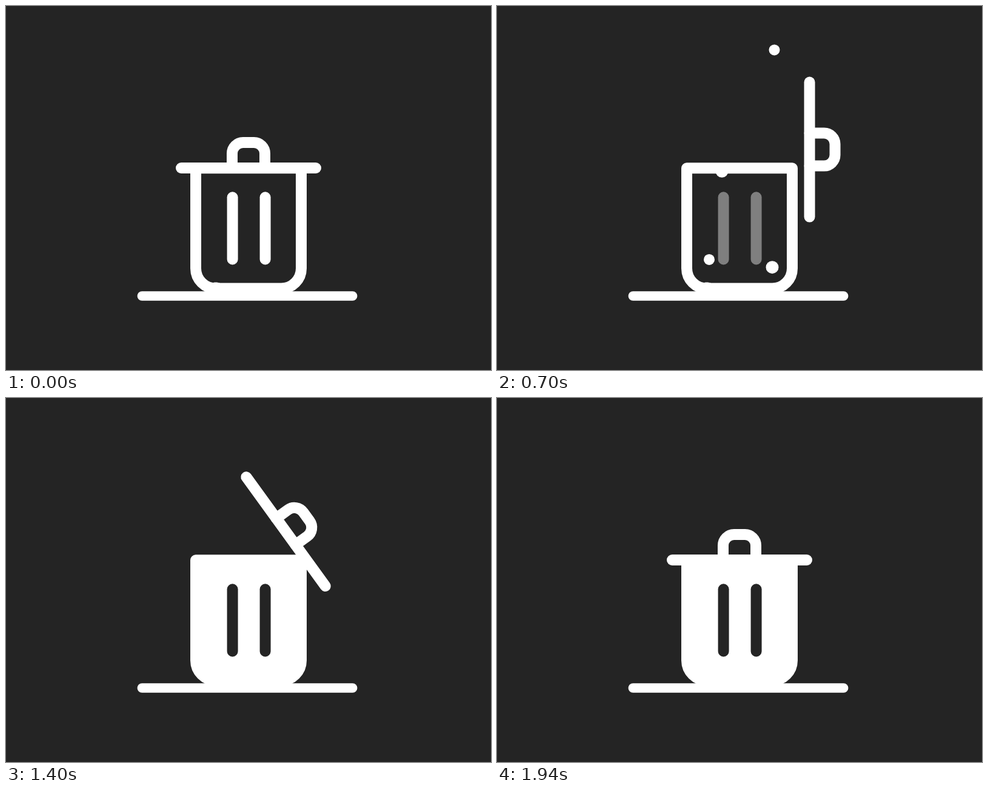
Write an HTML page with a canvas that moves like this. It is 800 px wide and 600 px high and loops after 1980 ms.

```html
<!DOCTYPE html>
<html lang="en">
<head>
<meta charset="utf-8">
<title>Bin</title>
<style>
html, body { margin: 0; width: 100%; height: 100%; overflow: hidden; background: #242424; }
canvas { display: block; }
</style>
</head>
<body>
<canvas id="stage" width="800" height="600"></canvas>
<script>
const ctx = document.getElementById('stage').getContext('2d');
const BG = '#242424', INK = '#fff', LOOP = 1980;

// x, start height, radius, start time
const dots = [
  [454, 100, 10.5, 355],
  [350, 105, 9, 362],
  [371, 92, 10.5, 448],
  [457.5, 49, 9, 614],
  [422.5, 95, 9.5, 716],
  [364, 100, 10.5, 802]
];

const span = (t, a, b) => Math.min(1, Math.max(0, (t - a) / (b - a)));
const ease = k => k * k * (3 - 2 * k);

function line(x1, y1, x2, y2, width, color) {
  ctx.lineWidth = width;
  ctx.strokeStyle = color;
  ctx.beginPath();
  ctx.moveTo(x1, y1);
  ctx.lineTo(x2, y2);
  ctx.stroke();
}

function binPath() {
  ctx.beginPath();
  ctx.moveTo(313, 267.3);
  ctx.lineTo(487, 267.3);
  ctx.arcTo(487, 465.5, 400, 465.5, 33);
  ctx.arcTo(313, 465.5, 313, 300, 33);
  ctx.closePath();
}

function drawFill(t) {
  const top = 455.5 - 285 * ease(span(t, 840, 1340));
  ctx.save();
  binPath();
  ctx.clip();
  ctx.beginPath();
  ctx.moveTo(304, 480);
  for (let x = 304; x <= 496; x += 2) {
    ctx.lineTo(x, top + 34 * (1 - Math.cos((x - 346) * Math.PI / 78)));
  }
  ctx.lineTo(496, 480);
  ctx.fillStyle = INK;
  ctx.fill();
  ctx.restore();
}

function drawDots(t) {
  ctx.fillStyle = INK;
  for (const [x, y, r, start] of dots) {
    const k = (t - start) / 360;
    if (k <= 0 || k >= 1) continue;
    ctx.globalAlpha = span(t, start, start + 77);
    ctx.beginPath();
    ctx.arc(x, y + (460 - y) * k * k, r, 0, Math.PI * 2);
    ctx.fill();
  }
  ctx.globalAlpha = 1;
}

function drawBin(t) {
  const shade = Math.round(255 - 219 * span(t, 560, 800));
  const color = `rgb(${shade},${shade},${shade})`;
  line(373.6, 315.3, 373.6, 417.5, 18, color);
  line(427.6, 315.3, 427.6, 417.5, 18, color);
  ctx.strokeStyle = INK;
  binPath();
  ctx.stroke();
}

// The lid turns about a hinge that slides as it opens
function drawLid(t) {
  const open = ease(span(t, 0, 400)) - ease(span(t, 1182, 1686));
  ctx.save();
  ctx.translate(494.15 - 25.7 * open, 314.1 + 16.6 * open);
  ctx.rotate(open * Math.PI / 2);
  ctx.translate(-94.15, -47.1);
  line(-111, 0, 111, 0, 18, INK);
  ctx.beginPath();
  ctx.moveTo(-27, 0);
  ctx.arcTo(-27, -42, 0, -42, 18);
  ctx.arcTo(27, -42, 27, 0, 18);
  ctx.lineTo(27, 0);
  ctx.stroke();
  ctx.restore();
}

function draw(t) {
  ctx.fillStyle = BG;
  ctx.fillRect(0, 0, 800, 600);
  ctx.lineCap = ctx.lineJoin = 'round';
  line(224.3, 478, 571.7, 478, 15.5, INK);
  const k = span(t, 1700, 1940);
  ctx.save();
  ctx.translate(0, -65 * 4 * k * (1 - k));
  drawFill(t);
  drawDots(t);
  drawBin(t);
  drawLid(t);
  ctx.restore();
}

const begin = performance.now();
function tick() {
  const t = (performance.now() - begin) % LOOP;
  draw(Math.floor(t / 20) * 20);
  requestAnimationFrame(tick);
}
tick();
</script>
</body>
</html>
```
